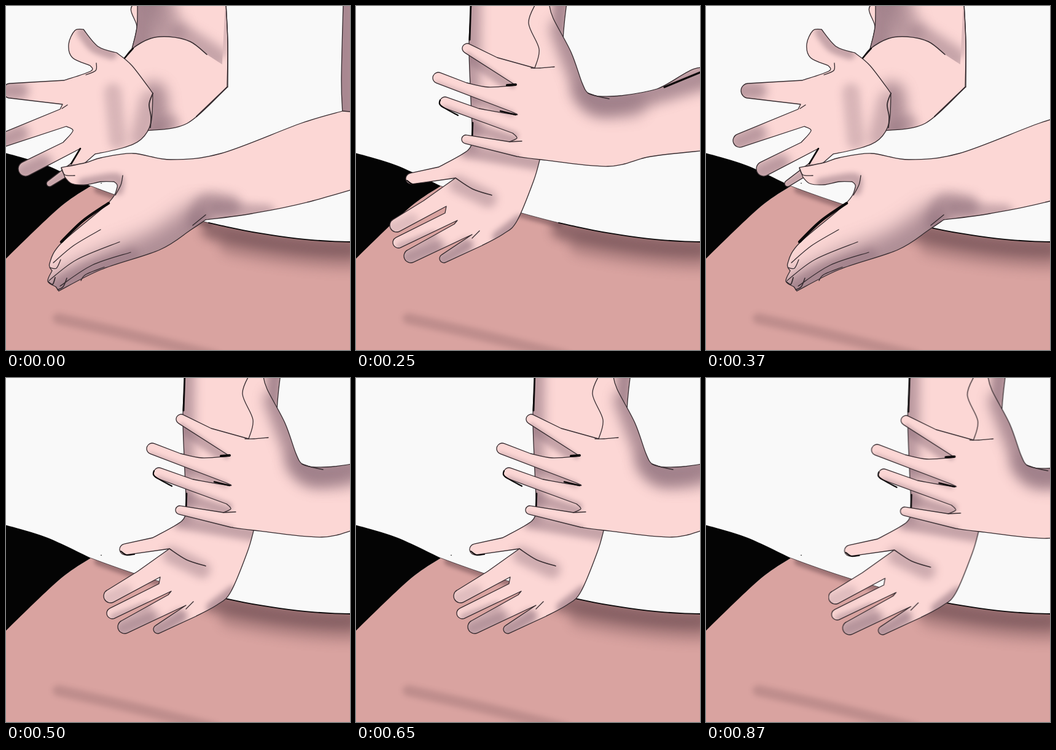
Recreate the animation shown at these times as an HTML page. Size 560x560 px, loop 1000 ms.

```html
<!DOCTYPE html>
<html lang="en">
<head>
<meta charset="utf-8">
<title>Hands along the back</title>
<style>
  html, body { margin: 0; width: 100%; height: 100%; overflow: hidden; background: #f9f9f9; }
  svg { display: block; width: 560px; height: 560px; }
</style>
</head>
<body>
<svg id="stage" viewBox="0 0 560 560"></svg>
<script>
const SKIN = '#fcd7d5', SHADE = '#8f707c', INK = '#352b2f', BLACK = '#0c090a';
const stage = document.getElementById('stage');
let clips = 0;

function add(parent, tag, attrs = {}) {
  const el = document.createElementNS('http://www.w3.org/2000/svg', tag);
  for (const key in attrs) el.setAttribute(key, attrs[key]);
  return parent.appendChild(el);
}

// Catmull-Rom spline through the points.
function spline(pts) {
  let d = '';
  for (let i = 0; i < pts.length - 1; i++) {
    const a = pts[i], b = pts[i + 1], before = pts[i - 1] || a, after = pts[i + 2] || b;
    const c1 = a.map((v, k) => v + (b[k] - before[k]) / 6);
    const c2 = b.map((v, k) => v - (after[k] - a[k]) / 6);
    d += `C${c1} ${c2} ${b}`;
  }
  return d;
}

// Two straight sides and a round tip, from one root to the other.
function finger(from, [x, y, r], to) {
  const dx = x - (from[0] + to[0]) / 2, dy = y - (from[1] + to[1]) / 2;
  const k = r / Math.hypot(dx, dy), nx = -dy * k, ny = dx * k;
  return `L${x + nx},${y + ny}A${r},${r} 0 0 0 ${x - nx},${y - ny}L${to}`;
}

// "|" makes a corner; "@x,y,r" is a finger with its tip centre and radius.
function path(spec) {
  const parts = spec.split('|').map(part =>
    part.trim().replace('@', '').split(/\s+/).map(p => p.split(',').map(Number)));
  let d = 'M' + parts[0][0], last = null;
  parts.forEach((pts, i) => {
    if (pts[0].length === 3) {
      d += finger(last, pts[0], parts[i + 1][0]);
      last = null;
    } else {
      d += spline(last ? [last, ...pts] : pts);
      last = pts[pts.length - 1];
    }
  });
  return d;
}

function line(parent, spec, width = 1.3, stroke = INK) {
  return add(parent, 'path', {
    d: path(spec), fill: 'none', stroke, 'stroke-width': width,
    'stroke-linecap': 'round', 'stroke-linejoin': 'round'
  });
}

function blur(size) {
  const id = 'blur' + size;
  if (!document.getElementById(id)) {
    const f = add(stage, 'filter', {
      id, filterUnits: 'userSpaceOnUse', x: -100, y: -100, width: 900, height: 800,
      'color-interpolation-filters': 'sRGB'
    });
    add(f, 'feGaussianBlur', { stdDeviation: size });
  }
  return `url(#${id})`;
}

// Filled outline; each shade is a soft stroke: [points, width, opacity].
function shape(parent, spec, shades = [], fill = SKIN, shadeColor = SHADE, ink = INK) {
  const d = path(spec) + 'Z', id = 'clip' + clips++;
  add(add(stage, 'clipPath', { id }), 'path', { d });
  add(parent, 'path', { d, fill });
  const inside = add(parent, 'g', { 'clip-path': `url(#${id})` });
  for (const [pts, width, opacity] of shades) {
    const soft = line(inside, pts, width, shadeColor);
    soft.setAttribute('opacity', opacity);
    soft.setAttribute('filter', blur(width / 4));
  }
  add(parent, 'path', { d, fill: 'none', stroke: ink, 'stroke-width': 1.3, 'stroke-linejoin': 'round' });
}

// Upper edge of the back, flattening out to the right.
function edge(from, to, drop = 0) {
  const pts = [];
  for (let i = 0; i <= 8; i++) {
    const x = from + (to - from) * i / 8;
    pts.push(`${x},${384 - 91 * ((560 - x) / 422) ** 1.77 + drop}`);
  }
  return pts.join(' ');
}

function drawBack() {
  const g = add(stage, 'g');
  const hip = '138,293 85,330 -5,416';
  shape(g, edge(138, 560) + ' | 565,565 | -5,565 | -5,416 85,330 138,293', [
    [edge(150, 330, 1), 13, .5],
    [edge(335, 560, 9), 34, .62],
    [edge(365, 560, 28), 36, .28],
    ['85,509 200,535 340,570', 18, .22]
  ], '#d9a3a0', '#64444a', 'none');
  shape(g, '-5,238 65,259 138,293 | ' + hip.slice(8), [], '#040404', SHADE, 'none');
  line(g, edge(138, 330), .8);
  line(g, edge(330, 560), 1.8, BLACK);
  add(g, 'circle', { cx: 155, cy: 288.5, r: .8 });
}

function drawReach() {
  const g = add(stage, 'g');

  // raised arm, split by the elbow crease
  const crease = '192,87 205,70 235,53 265,50 300,58 327,79';
  shape(g, '192,87 | 225,150 229,203 | 295,191 360,132 | 361,60 358,-5 | 214,-5 213,35 205,70', [
    ['240,145 246,200', 44, .7],
    ['268,192 240,205', 30, .4],
    ['350,75 356,10', 20, .3]
  ]);
  shape(g, '214,-5 213,35 205,70 | 235,53 265,50 300,58 327,79 | 352,95 | 357,-5', [
    ['222,-20 218,80', 64, .8],
    ['250,-10 268,42', 44, .5],
    ['285,45 345,85', 34, .5]
  ], SKIN, SHADE, 'none');
  line(g, '214,-5 213,35 205,70');
  line(g, '361,132 361,60 358,-5');
  line(g, crease, 1.5);
  line(g, '191,87 207,69', 2.4, BLACK);
  line(g, '360,132 310,180', 2);

  // open palm
  shape(g, '180,76 150,66 126,38 | 112,40 102,62 108,84 137,97 | 138,106 95,121 | @7,138,12 | 92,160 | 88,168 | @-7,219,11 | 98,196 109,203 93,222 | @32,265,12 | 121,232 | 106,256 | @71,289,5 | 112,270 | 145,241 | 190,231 220,217 236,190 239,142 | 205,97 180,76', [
    ['124,42 143,66 172,78', 18, .5],
    ['-5,138 22,138', 30, .6],
    ['-10,222 22,208', 30, .6],
    ['28,270 60,256', 30, .6],
    ['70,291 108,265', 14, .5],
    ['174,140 182,220', 28, .32],
    ['236,155 220,215', 36, .42]
  ]);
  line(g, '121,232 106,257', 2.6, BLACK);
  line(g, '147,93 146,105 130,112');
  line(g, '91,167 100,161');
  line(g, '239,142 233,160 236,180 235,198', 1.8);

  // upper arm at the far right
  shape(g, '549,-5 546,120 548,176 | 640,185 | 640,-5', [['550,-20 550,190', 60, .8]]);

  // stroking hand and forearm
  shape(g, '90,263 130,255 155,247 207,240 268,250 350,240 480,191 548,171 | 660,180 | 660,270 | 500,317 400,338 325,348 | 300,365 250,397 155,429 86,464 | 81,457 | 68,448 75,431 | 71,419 90,386 165,322 181,295 176,286 | 155,286 130,291 107,289 96,279', [
    ['85,470 170,428 250,396 312,354', 64, .72],
    ['82,455 130,430 205,404', 22, .4],
    ['312,350 326,322 365,325', 34, .6],
    ['345,332 425,336', 26, .45],
    ['125,288 180,280 183,300', 16, .5]
  ]);
  line(g, '90,384 125,350 167,321', 4.5, BLACK);
  line(g, '77,418 110,390 154,364');
  line(g, '70,447 115,413 185,384');
  line(g, '88,456 140,422 203,401');
  line(g, '122,447 130,437 160,425');
  line(g, '72,426 82,427 89,413');
  line(g, '69,449 76,453 80,442', 1.8);
  line(g, '84,462 93,457 99,443', 1.6);
  line(g, '90,264 96,275 112,276');
  line(g, '190,276 187,291 178,308');
  line(g, '304,357 325,340', 1.5);
  return g;
}

function drawHold() {
  const g = add(stage, 'g');

  // held arm, hanging hand
  shape(g, '188,-5 184,60 186,130 190,214 | 182,235 135,262 | @90,281,9 | 162,280 110,317 | @66,357,11 | 147,326 | 145,337 | @69,385,9 | 165,349 | 160,355 | @89,407,11 | 189,372 | @143,411,7 | 205,390 | 240,371 262,350 289,285 300,247 | 330,150 338,40 343,-5', [
    ['186,-10 185,220', 34, .6],
    ['335,-10 330,40', 28, .75],
    ['188,85 255,132', 20, .5],
    ['186,143 255,180', 18, .5],
    ['190,198 262,221', 18, .5],
    ['180,236 300,256', 24, .5],
    ['165,290 215,314', 28, .42],
    ['62,362 90,350', 24, .25],
    ['72,391 125,372', 14, .35],
    ['85,410 130,392', 28, .65],
    ['142,414 180,390', 22, .65],
    ['232,376 266,350', 20, .6]
  ]);
  line(g, '187,-5 185,55', 2.8, BLACK);
  line(g, '190,190 189,215', 2.6, BLACK);
  line(g, '162,280 190,298 221,308', 1.5);
  line(g, '83,284 92,290 105,289', 2, BLACK);
  line(g, '189,378 201,366');

  // holding hand and its forearm
  shape(g, '293,-5 281,28 298,70 291,101 | 230,84 | @181,69,8 | 260,129 | 215,132 180,125 | @134,117,9 | 253,172 | 260,177 200,167 | @145,157,9 | 255,207 | 262,215 250,221 | @179,217,7 | 262,245 | 300,250 410,261 480,245 570,235 | 570,104 490,135 430,146 395,147 | 378,142 368,125 350,75 321,20 314,-5', [
    ['336,38 364,110 385,150 430,154 570,115', 40, .7],
    ['372,140 395,160 450,160', 44, .45],
    ['132,128 253,175', 12, .3],
    ['145,169 258,211', 14, .4],
    ['176,226 262,247', 12, .3],
    ['182,79 255,130', 10, .3]
  ]);
  line(g, '285,101 300,101 323,99');
  line(g, '246,129 260,128', 4, BLACK);
  line(g, '235,171 260,177', 2.4, BLACK);
  line(g, '137,153 138,162 166,178', 2.2, BLACK);
  line(g, '250,221 270,220');
  line(g, '378,142 393,147 412,151', 1.6);
  line(g, '502,132 570,104', 3.2, BLACK);
  return g;
}

drawBack();
const reach = drawReach(), hold = drawHold();

// start, visible pose, shift right, shift down
const STEPS = [
  [0, reach, 0, 0], [250, hold, 0, 0], [370, reach, 62, 0],
  [500, hold, 104, -2], [750, reach, 155, 0], [870, hold, 144.5, 0]
];
const LOOP = 1000;

for (const pose of [reach, hold]) {
  const keys = STEPS.map(([start, shown, x, y]) => ({
    offset: start / LOOP,
    transform: `translate(${x}px, ${y}px)`,
    visibility: shown === pose ? 'visible' : 'hidden',
    easing: 'step-end'
  }));
  keys.push({ ...keys[0], offset: 1 });
  pose.animate(keys, { duration: LOOP, iterations: Infinity }).startTime = 0;
}
</script>
</body>
</html>
```
